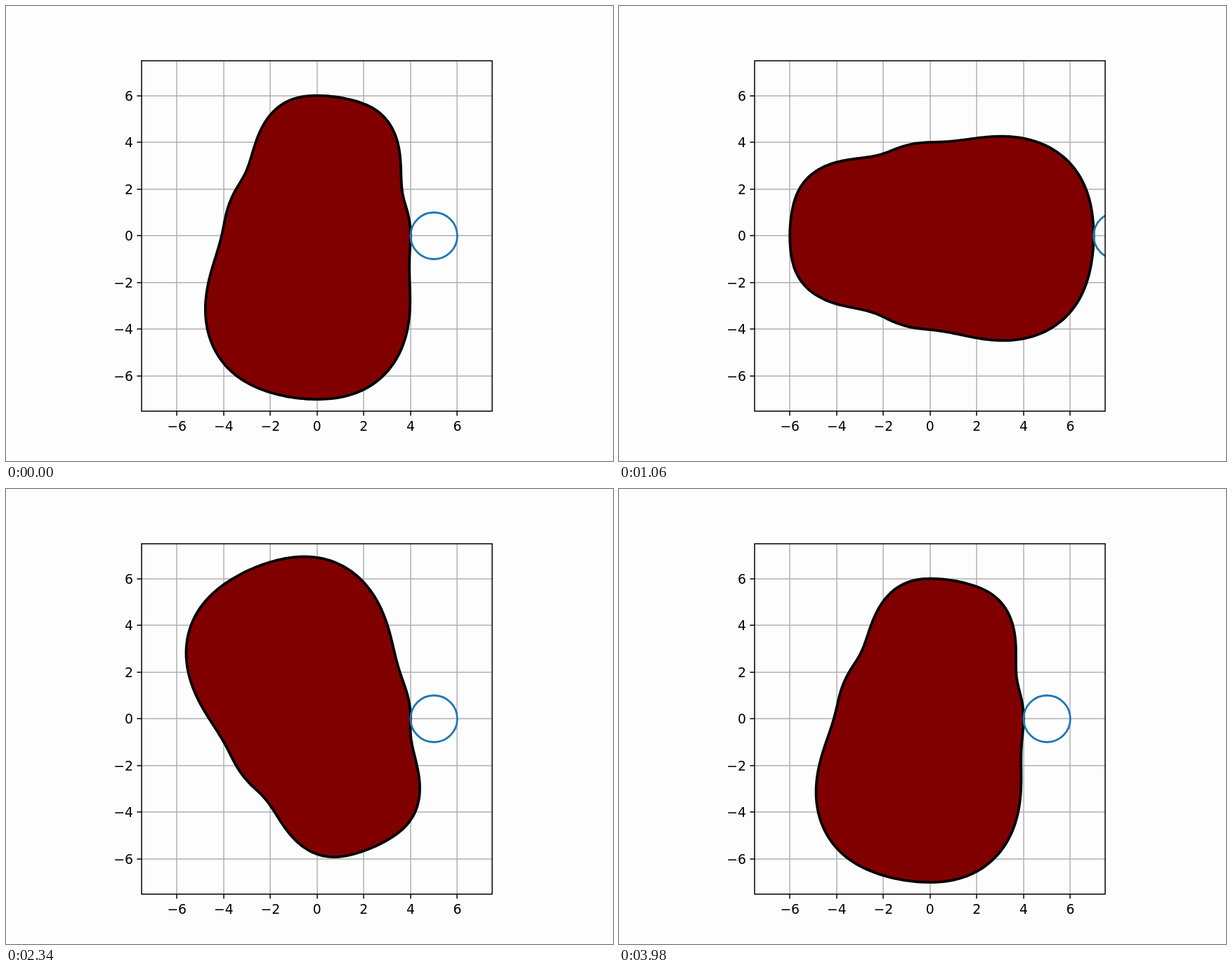
Write an HTML page with a canvas that moves like this. It is 864 px wide and 648 px high and loops after 4000 ms.

```html
<!DOCTYPE html>
<html lang="en">
<head>
<meta charset="utf-8">
<title>Cam and follower</title>
<style>
html, body { margin: 0; width: 100%; height: 100%; overflow: hidden; background: #fdfdfd; }
canvas { display: block; }
</style>
</head>
<body>
<canvas id="stage" width="864" height="648"></canvas>
<script>
const ctx = document.getElementById('stage').getContext('2d');
const LOOP = 4000, STEP = 20;
const CX = 442.8, CY = 327.24, UNIT = 33.264;
const LEFT = 193, RIGHT = 692, TOP = 78, BOTTOM = 577;
const TICKS = [-6, -4, -2, 0, 2, 4, 6];
const RAD = Math.PI / 180;

// Cam lift: start angle, end angle, start radius, end radius; dwells lie between.
const MOVES = [[15, 75, 4, 6], [90, 150, 6, 4], [165, 255, 4, 7], [270, 360, 7, 4]];

const px = x => CX + x * UNIT;
const py = y => CY - y * UNIT;

function radius(deg) {
  const a = ((deg % 360) + 360) % 360;
  let r = 4;
  for (const [from, to, r0, r1] of MOVES) {
    if (a < from) break;
    const u = Math.min(1, (a - from) / (to - from));
    r = r0 + (r1 - r0) * (u - Math.sin(2 * Math.PI * u) / (2 * Math.PI)); // cycloidal
  }
  return r;
}

function line(x0, y0, x1, y1) {
  ctx.beginPath();
  ctx.moveTo(x0, y0);
  ctx.lineTo(x1, y1);
  ctx.stroke();
}

function pen(color, width) {
  ctx.strokeStyle = color;
  ctx.lineWidth = width;
}

function drawGrid() {
  pen('#b0b0b0', 1.5);
  for (const v of TICKS) {
    const x = Math.round(px(v)), y = Math.round(py(v));
    line(x, TOP, x, BOTTOM);
    line(LEFT, y, RIGHT, y);
  }
}

function drawCam(turn) {
  ctx.beginPath();
  for (let a = 0; a < 360; a++) {
    const r = radius(a), b = (a + turn) * RAD;
    ctx.lineTo(px(r * Math.cos(b)), py(r * Math.sin(b)));
  }
  ctx.closePath();
  ctx.fillStyle = '#800000';
  ctx.fill();
  pen('#000', 3.75);
  ctx.stroke();
}

function drawFollower(turn) {
  ctx.save();
  ctx.beginPath();
  ctx.rect(LEFT, TOP, RIGHT - LEFT, BOTTOM - TOP);
  ctx.clip();
  ctx.beginPath();
  ctx.arc(px(radius(-turn) + 1), CY, UNIT, 0, 2 * Math.PI);
  pen('#1f77b4', 2.8);
  ctx.stroke();
  ctx.restore();
}

function drawAxes() {
  pen('#000', 1.5);
  ctx.strokeRect(LEFT, TOP, RIGHT - LEFT, BOTTOM - TOP);
  ctx.fillStyle = '#000';
  ctx.font = '18.75px "DejaVu Sans", sans-serif';
  for (const v of TICKS) {
    const x = Math.round(px(v)), y = Math.round(py(v));
    const label = String(v).replace('-', '\u2212');
    line(x, BOTTOM, x, BOTTOM + 6.6);
    line(LEFT, y, LEFT - 6.6, y);
    ctx.textAlign = 'center';
    ctx.fillText(label, px(v), 604.5);
    ctx.textAlign = 'right';
    ctx.fillText(label, 181, y + 7);
  }
}

function draw(now) {
  const t = Math.floor((now % LOOP) / STEP) * STEP;
  const turn = 360 * t / LOOP;
  ctx.fillStyle = '#fdfdfd';
  ctx.fillRect(0, 0, 864, 648);
  drawGrid();
  drawCam(turn);
  drawFollower(turn);
  drawAxes();
  requestAnimationFrame(draw);
}
draw(0);
</script>
</body>
</html>
```
